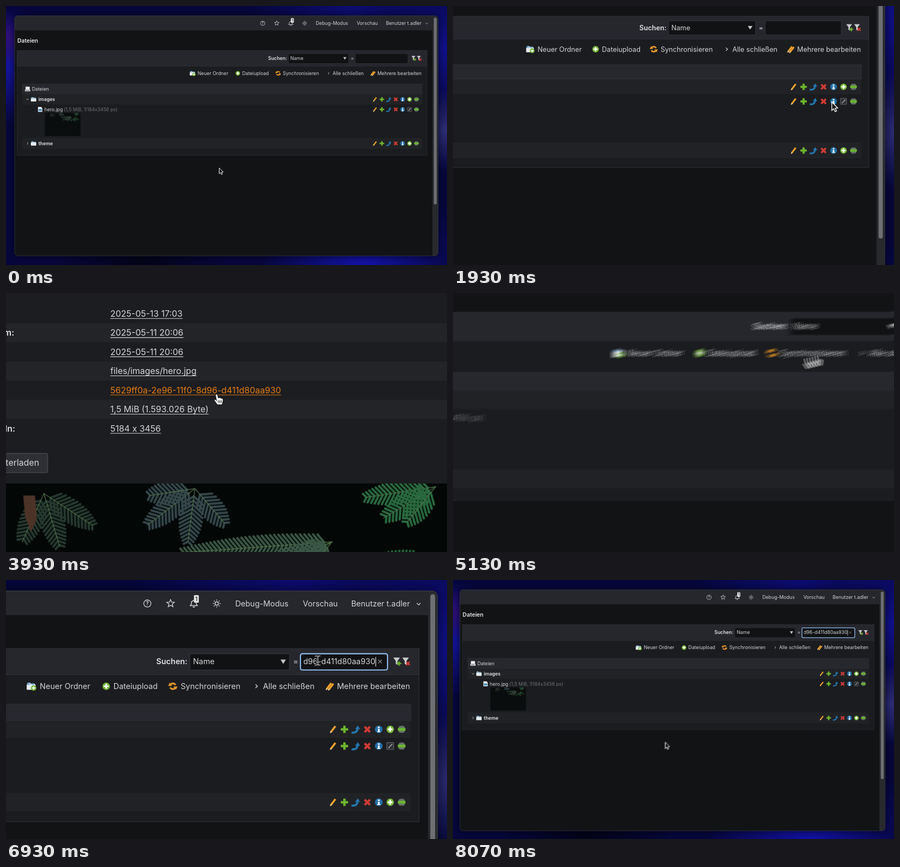
Animation, 816 px wide and 480 px high, one loop 8.14 s. Source, as an HTML page with a canvas:

```html
<!DOCTYPE html>
<html lang="de">
<head>
<meta charset="utf-8">
<title>Dateien</title>
<style>
html, body { margin: 0; width: 100%; height: 100%; overflow: hidden; background: #05052a; }
canvas { display: block; width: 816px; height: 480px; }
</style>
</head>
<body>
<canvas id="stage" width="816" height="480"></canvas>
<script>
const W = 816, H = 480, LOOP = 8140, STEP = LOOP / 122;
const context = canvas => canvas.getContext('2d', { willReadFrequently: true });
const makeCtx = (w, h) => context(Object.assign(document.createElement('canvas'), { width: w, height: h }));
const out = context(document.getElementById('stage'));
const layer = makeCtx(W, H);
let c = layer;

// time, zoom, offset x, offset y
const CAMERA = [
  [500, 1, 0, 0], [1700, 1.444, -355.6, -100], [2750, 1.444, -355.6, -100],
  [3070, 1.445, -341, -100], [3850, 1.826, -233, -146], [4750, 1.826, -233, -146],
  [5950, 1.7, -561, -10], [6637, 1.7, -561, -10], [8140, 1, 0, 0]
];
// time, x, y
const POINTER = [
  [450, 394.5, 300], [1750, 731.7, 192.5], [2940, 731.7, 192], [3770, 340.6, 182.4],
  [4700, 340.6, 182.4], [5450, 665.5, 96], [6950, 665.5, 96], [7850, 394.5, 300]
];
const OPEN = 2100, CLOSE = 4650, FOCUS = 5800, PASTE = 6150, SHUTTER = 35;
const UUID = '5629ff0a-2e96-11f0-8d96-d411d80aa930';

function track(keys, t) {
  const i = keys.findIndex(k => k[0] > t);
  if (i < 1) return keys.at(i).slice(1);
  const a = keys[i - 1], b = keys[i], u = (t - a[0]) / (b[0] - a[0]);
  return a.slice(1).map((v, j) => v + (b[j + 1] - v) * u * u * (3 - 2 * u));
}

function text(s, x, y, color = '#d3d4d6', weight = 400, size = 8.75, align = 'left') {
  c.font = `${weight} ${size}px Inter, "Liberation Sans", sans-serif`;
  c.textAlign = align;
  c.fillStyle = color;
  c.fillText(s, x, y + size * .36);
}
function paint(fill, line, lw) {
  if (fill) { c.fillStyle = fill; c.fill(); }
  if (line) { c.strokeStyle = line; c.lineWidth = lw; c.stroke(); }
}
function rect(x, y, x2, y2, fill, r = 0, line, lw = .7) {
  c.beginPath();
  c.roundRect(x, y, x2 - x, y2 - y, r);
  paint(fill, line, lw);
}
function trace(points) {
  c.beginPath();
  for (let i = 0; i < points.length; i += 2) c.lineTo(points[i], points[i + 1]);
}
function poly(points, fill, line, lw = .6) {
  trace(points);
  c.closePath();
  paint(fill, line, lw);
}
function stroke(points, color, lw = 1) {
  trace(points);
  paint(null, color, lw);
}
function disc(x, y, r, fill, line, lw = .8) {
  c.beginPath();
  c.arc(x, y, r, 0, 2 * Math.PI);
  paint(fill, line, lw);
}
function cross(r, color, lw) {
  stroke([-r, 0, r, 0], color, lw);
  stroke([0, -r, 0, r], color, lw);
}
function ex(r, color, lw) {
  stroke([-r, -r, r, r], color, lw);
  stroke([-r, r, r, -r], color, lw);
}
function put(icon, x, y, ...args) {
  c.save();
  c.translate(x, y);
  icon(...args);
  c.restore();
}

const icons = {
  pencil() {
    poly([-3.4, 4.4, -2.8, 1.8, 1.8, -4.2, 3.6, -2.9, -1.1, 3.2], '#eda02c');
    poly([-3.4, 4.4, -2.8, 1.8, -1.1, 3.2], '#e8d2a8');
  },
  plus() { cross(4.1, '#6cb52d', 2.7); },
  move() {
    c.beginPath();
    c.moveTo(-4.8, 3.6);
    c.quadraticCurveTo(1.2, 4.4, 1.8, -.6);
    paint(null, '#2377b0', 2.3);
    poly([-.9, -.5, 2.4, -4.4, 4.6, -.2], '#2377b0');
  },
  remove() { ex(3, '#cf3c37', 2.5); },
  info() {
    disc(0, 0, 4.3, '#2371a9');
    rect(-1, -3, 1, -1.4, '#fff');
    rect(-1, -.6, 1, 2.9, '#fff');
    stroke([-1.7, 2.7, 1.7, 2.7], '#fff', .8);
  },
  add() { disc(0, 0, 4.2, '#71b336'); cross(2.7, '#fff', 1.8); },
  edit() {
    rect(-3.8, -3.8, 3.8, 3.8, '#2c2d30', .5, '#6a6b6e');
    stroke([-2, 2.2, 2.3, -2.2], '#a0a1a3', 1.2);
  },
  eye() {
    rect(-3.5, -3.9, 3.5, 3.9, '#66716a', 2.4);
    rect(-4.3, -1.6, 4.3, 1.6, '#69b530', .5);
  },
  folder() {
    poly([-5, -1, -4, -4, -1, -4, 0, -3, 4, -3, 5, -1], '#a9c8e0');
    rect(-5, -1.6, 5, 4, '#e8ebed', .8);
    stroke([-3, -4, -3, -1.5], '#5a9bcb', 1.4);
    stroke([2, -3.4, 2, -1.5], '#5a9bcb', 1.4);
  },
  newFolder() {
    icons.folder();
    disc(2.8, 2, 3, '#69b530');
    c.translate(2.8, 2);
    cross(1.9, '#fff', 1.2);
  },
  sync() {
    for (const a of [0, Math.PI]) {
      c.beginPath();
      c.arc(0, 0, 3.2, a + .3, a + 2.7);
      paint(null, '#e49627', 2);
    }
    poly([-5.2, -.2, -3.5, -4, -.6, -.4], '#e49627');
    poly([5.2, .2, 3.5, 4, .6, .4], '#e49627');
  },
  pencils() {
    icons.pencil();
    c.translate(2.4, .7);
    icons.pencil();
  },
  drive() {
    rect(-3.8, -4.4, 3.8, 1, '#eceded', .6);
    rect(-5, .8, 5, 4.3, '#c3c5c8', .8);
    stroke([-3, 2.6, 2, 2.6], '#707276', .8);
  },
  image() {
    poly([-3.8, -4.6, 2, -4.6, 4.2, -2.3, 4.2, 4.6, -3.8, 4.6], '#e6e9ec');
    rect(-2.7, -.6, 3.1, 3.2, '#2e7db8');
    poly([-2.7, 3.2, 0, .8, 3.1, 3.2], '#7fb4d8');
  },
  funnel(add) {
    poly([-4.4, -4.4, 3, -4.4, .3, -.7, .3, 4, -1.7, 2.5, -1.7, -.7], '#c9cacc');
    c.translate(2, 2.2);
    if (add) cross(2.4, '#6cb52d', 1.6);
    else ex(1.9, '#d63a35', 1.6);
  },
  chevron(down) {
    if (down) c.rotate(Math.PI / 2);
    stroke([-1, -2, 1.1, 0, -1, 2], '#c5c6c8', .9);
  },
  help() {
    disc(0, 0, 4, null, '#d3d4d6');
    text('?', 0, 0, '#d3d4d6', 600, 6, 'center');
  },
  star() {
    const p = [];
    for (let i = 0; i < 10; i++) {
      const a = i * Math.PI / 5, r = i % 2 ? 2 : 4.5;
      p.push(r * Math.sin(a), -r * Math.cos(a));
    }
    poly(p, null, '#d3d4d6', .8);
  },
  bell() {
    poly([-4, 2.4, -2.8, .8, -2.6, -2, 0, -3.8, 2.6, -2, 2.8, .8, 4, 2.4], null, '#d3d4d6', .9);
    stroke([-1.2, 4, 1.2, 4], '#d3d4d6', 1);
    rect(.1, -9.4, 5.6, -.9, '#e2e2e3', 1);
    text('1', 2.9, -5.1, '#222', 500, 6.5, 'center');
  },
  sun() {
    disc(0, 0, 1.9, null, '#d3d4d6', .9);
    for (let i = 0; i < 8; i++) {
      c.rotate(Math.PI / 4);
      stroke([3.2, 0, 4.4, 0], '#d3d4d6', .9);
    }
  }
};

// Runs a drawing once on its own canvas.
function prerender(w, h, paintIt) {
  c = makeCtx(w, h);
  paintIt();
  const canvas = c.canvas;
  c = layer;
  return canvas;
}

// Dark picture with a few simplified fern fronds: base x, base y, colour, tips
const FERNS = [
  [99, 10, '#25382f', [148, 42, 115, 64, 77, 59]],
  [252, 5, '#34464a', [204, 42, 245, 59, 206, 12, 282, 40]],
  [391, 59, '#3a5645', [238, 70, 266, 108, 304, 115, 339, 123]],
  [412, 92, '#236038', [380, 128, 474, 73, 502, 101, 446, 126]],
  [496, 3, '#28683e', [425, 14, 443, 35, 467, 39]]
];
const photo = prerender(1052, 702, () => {
  c.scale(2, 2);
  rect(0, 0, 526, 351, '#030706');
  c.lineCap = 'round';
  for (const [x, y, color, tips] of FERNS) {
    for (let i = 0; i < tips.length; i += 2) {
      const dx = tips[i] - x, dy = tips[i + 1] - y, len = Math.hypot(dx, dy), dir = Math.atan2(dy, dx);
      for (let d = 8; d < len; d += 4.2) {
        const u = d / len, r = 3 + 11 * Math.sin(Math.PI * (.2 + .75 * u));
        const px = x + dx * u, py = y + dy * u;
        for (const a of [dir - .95, dir + .95])
          stroke([px, py, px + r * Math.cos(a), py + r * Math.sin(a)], color, 2.3);
      }
      stroke([x, y, tips[i], tips[i + 1]], '#50704a', .7);
    }
  }
  poly([78, 12, 90, 12, 92, 36, 86, 49, 80, 34], '#4b3427');
  stroke([512, 0, 513, 40], '#492e25', 1.5);
});
const thumb = prerender(132, 86, () => c.drawImage(photo, 0, 0, 132, 86));

function glow(x, y, r, color) {
  const g = c.createRadialGradient(x, y, 0, x, y, r);
  g.addColorStop(0, color);
  g.addColorStop(1, color + '00');
  c.fillStyle = g;
  c.fillRect(x - r, y - r, 2 * r, 2 * r);
}
const wallpaper = prerender(W, H, () => {
  rect(0, 0, W, H, '#06063c');
  glow(0, 110, 110, '#1414a0');
  glow(0, 60, 50, '#30107a');
  glow(640, 0, 190, '#0c0c72');
  glow(816, 80, 130, '#10108c');
  glow(816, 230, 75, '#2e2e78');
  glow(660, 490, 190, '#1212a8');
  glow(250, 480, 160, '#030318');
  c.shadowColor = '#000a';
  c.shadowBlur = 14;
  rect(16, 18, 799.5, 463, '#121315', 6);
});

function toolbar() {
  rect(16, 18, 789, 45, '#26272c', [6, 0, 0, 0]);
  put(icons.help, 475, 32);
  put(icons.star, 501, 32);
  put(icons.bell, 527, 32);
  put(icons.sun, 552.6, 32);
  text('Debug-Modus', 573.3, 32);
  text('Vorschau', 649, 32);
  text('Benutzer t.adler', 703, 32);
  put(icons.chevron, 778.5, 32.5, true);
}

function search(t) {
  text('Suchen:', 485, 97, '#e0e1e3', 600);
  rect(522.5, 88.3, 634, 106.5, '#111214', 1.5, '#33343a');
  text('Name', 526, 97);
  poly([624, 94.8, 630, 94.8, 627, 99.6], '#c5c6c8');
  text('=', 638, 97);
  const active = t >= FOCUS, pasted = t >= PASTE;
  rect(646.3, 88.3, 743.7, 106.5, '#111214', active ? 2 : 1.5, active ? '#8fbdf0' : '#33343a', active ? 1.3 : .7);
  if (pasted) {
    c.save();
    c.beginPath();
    c.rect(650, 89, 81, 17);
    c.clip();
    text(UUID, 730, 97, '#d3d4d6', 400, 8.75, 'right');
    c.restore();
    put(ex, 735.3, 97, 2, '#8a8b8e', .8);
  }
  if (active) {
    const x = pasted ? 730.5 : 650.5;
    stroke([x, 92, x, 102.5], '#eee', .7);
  }
  put(icons.funnel, 754.6, 97, true);
  put(icons.funnel, 764.6, 97, false);
}

function actions() {
  const list = [['newFolder', 345, 'Neuer Ordner', 354.7], ['add', 429, 'Dateiupload', 437],
    ['sync', 503.5, 'Synchronisieren', 512.3], ['chevron', 597, 'Alle schließen', 604.3],
    ['pencils', 678, 'Mehrere bearbeiten', 687.2]];
  for (const [icon, x, label, tx] of list) {
    put(icons[icon], x, 124.7);
    text(label, tx, 124.7);
  }
}

function rowIcons(y, sixth) {
  ['pencil', 'plus', 'move', 'remove', 'info', sixth, 'eye']
    .forEach((name, i) => put(icons[name], 682.7 + 12.8 * i, y));
}
function folderRow(name, y, open) {
  put(icons.chevron, 40, y, open);
  put(icons.folder, 51, y);
  text(name, 60, y, '#e4e5e7', 600);
  rowIcons(y, 'add');
}
function tree() {
  rect(30.5, 144.7, 769.5, 162.9, '#27282e', 0, '#303137');
  rect(30.5, 163.4, 769.5, 182, '#212225');
  rect(30.5, 245.2, 769.5, 264, '#212225');
  for (const y of [182, 245, 264]) stroke([30.5, y, 769.5, y], '#292a2e', .5);
  put(icons.drive, 40, 154);
  text('Dateien', 48, 154);
  folderRow('images', 173, true);
  put(icons.image, 63, 191.7);
  text('hero.jpg', 71, 191.7);
  text('(1,5 MiB, 5184x3456 px)', 107, 191.7, '#707174');
  c.globalAlpha = .65;
  c.drawImage(thumb, 72, 198, 66, 43);
  c.globalAlpha = 1;
  rowIcons(191.7, 'edit');
  folderRow('theme', 254.7, false);
}

function page(t) {
  rect(16, 18, 799.5, 463, '#121315', 6);
  toolbar();
  rect(789, 18, 799.5, 463, '#28292c', [0, 6, 6, 0]);
  rect(791.6, 21.5, 797, 367.7, '#6e6f72', 2.7);
  text('Dateien', 21, 64, '#e4e5e7', 600, 10.4);
  rect(20.5, 82.6, 779, 276.5, '#1b1c1f', 0, '#2f3036');
  rect(20.5, 82.6, 779, 111.7, '#26272d', 0, '#313238');
  search(t);
  actions();
  tree();
}

function modal(hover) {
  rect(16, 18, 799.5, 463, 'rgba(0,3,4,.58)', 6);
  rect(47, 57, 613.8, 447, '#1c1d20', 2, '#46474c');
  rect(47, 57, 613.8, 79.2, '#2a2b30', [2, 2, 0, 0]);
  stroke([47, 79.2, 613.8, 79.2], '#45464b', .7);
  rect(603, 79.6, 613.4, 447, '#27282b');
  rect(606, 81.5, 611.5, 296.3, '#737477', 2.7);
  const values = ['2025-05-13 17:03', '2025-05-11 20:06', '2025-05-11 20:06', 'files/images/hero.jpg',
    UUID, '1,5 MiB (1.593.026 Byte)', '5184 x 3456'];
  values.forEach((value, i) => {
    const y = 100.9 + 19.42 * i, color = hover && i === 4 ? '#e57c12' : '#d5d6d8';
    if (i % 2) rect(57, y - 9.7, 593, y + 9.7, '#232428');
    text(value, 233.3, y, color);
    const end = 233.3 + c.measureText(value).width;
    stroke([233.3, y + 4.9, end, y + 4.9], color, .6);
  });
  text('Änderungsdatum:', 136, 120.3, '#e0e1e3', 600, 8.75, 'right');
  text('Größe in Pixeln:', 137, 217.4, '#e0e1e3', 600, 8.75, 'right');
  rect(67, 242.8, 169.8, 262.2, '#2e2f34', 1.5, '#4a4b50');
  text('Datei herunterladen', 161.2, 252.3, '#d5d6d8', 400, 8.75, 'right');
  c.drawImage(photo, 0, 0, 1052, 346, 67, 273.5, 526, 173);
}

function arrow() {
  poly([0, 0, 0, 10.8, 2.5, 8.6, 4.2, 12.4, 6, 11.6, 4.3, 8, 7.5, 7.7], '#0c0c0c', '#f2f2f2', 1);
}
function hand() {
  poly([-.9, .6, .6, 0, 1.5, .8, 2, 3.8, 3.8, 3.6, 5.2, 4.3, 6.6, 4.6, 7.2, 6, 6.6, 8.8, 6, 11, 1, 11,
    -1.6, 7.2, -2.4, 5.6, -1, 5.4, .2, 6.4], '#f5f5f5', '#111', .6);
  for (const x of [2.2, 3.7, 5.2]) stroke([x, 6.6, x, 9.2], '#222', .6);
}
function beam() {
  for (const [color, lw] of [['#111', 2.2], ['#f5f5f5', 1.1]]) {
    for (const s of [-1, 1]) stroke([-2.8, 5.2 * s, -.8, 5 * s, 0, 4 * s, .8, 5 * s, 2.8, 5.2 * s], color, lw);
    stroke([0, -4, 0, 4], color, lw);
    stroke([-1.5, 1.8, 1.5, 1.8], color, lw);
  }
}

// Distance covered while the shutter is open
function travel(place, t) {
  const a = place(t - SHUTTER / 2), b = place(t + SHUTTER / 2);
  return [b[0] - a[0], b[1] - a[1]];
}
const far = ([dx, dy]) => Math.hypot(dx, dy) > 2;

function pointer(t, zoom) {
  const place = time => {
    const [z, ox, oy] = track(CAMERA, time), [x, y] = track(POINTER, time);
    return [x * z + ox, y * z + oy];
  };
  const shape = t < 1980 || t >= 7080 ? arrow : t < 5250 ? hand : beam;
  const [x, y] = place(t), move = travel(place, t);
  const n = far(move) ? 6 : 1;
  c = out;
  for (let i = 0; i < n; i++) {
    const k = n > 1 ? i / (n - 1) - .5 : 0;
    c.setTransform(zoom, 0, 0, zoom, x + move[0] * k, y + move[1] * k);
    c.globalAlpha = n > 1 ? .3 : 1;
    shape();
  }
  c.globalAlpha = 1;
}

function draw(t) {
  const [zoom, ox, oy] = track(CAMERA, t);
  c = layer;
  c.setTransform(zoom, 0, 0, zoom, ox, oy);
  c.drawImage(wallpaper, 0, 0);
  page(t);
  if (t >= OPEN && t < CLOSE) modal(t > 3650);
  rect(16, 18, 799.5, 463, null, 6, '#3c3d44', .7);

  const cx = (W / 2 - ox) / zoom, cy = (H / 2 - oy) / zoom;
  const move = travel(time => {
    const [z, x, y] = track(CAMERA, time);
    return [cx * z + x, cy * z + y];
  }, t);
  out.setTransform(1, 0, 0, 1, 0, 0);
  out.drawImage(layer.canvas, 0, 0);
  if (t < 6500 && far(move)) {
    for (let i = 0; i < 6; i++) {
      out.globalAlpha = 1 / (i + 1);
      out.drawImage(layer.canvas, Math.round(move[0] * (i / 5 - .5)), Math.round(move[1] * (i / 5 - .5)));
    }
    out.globalAlpha = 1;
  }
  pointer(t, zoom);
}

const start = performance.now();
let shown = -1;
function tick() {
  const step = Math.floor(((performance.now() - start) % LOOP + 8) / STEP) % 122;
  if (step !== shown) draw(step * STEP);
  shown = step;
  requestAnimationFrame(tick);
}
tick();
</script>
</body>
</html>
```
